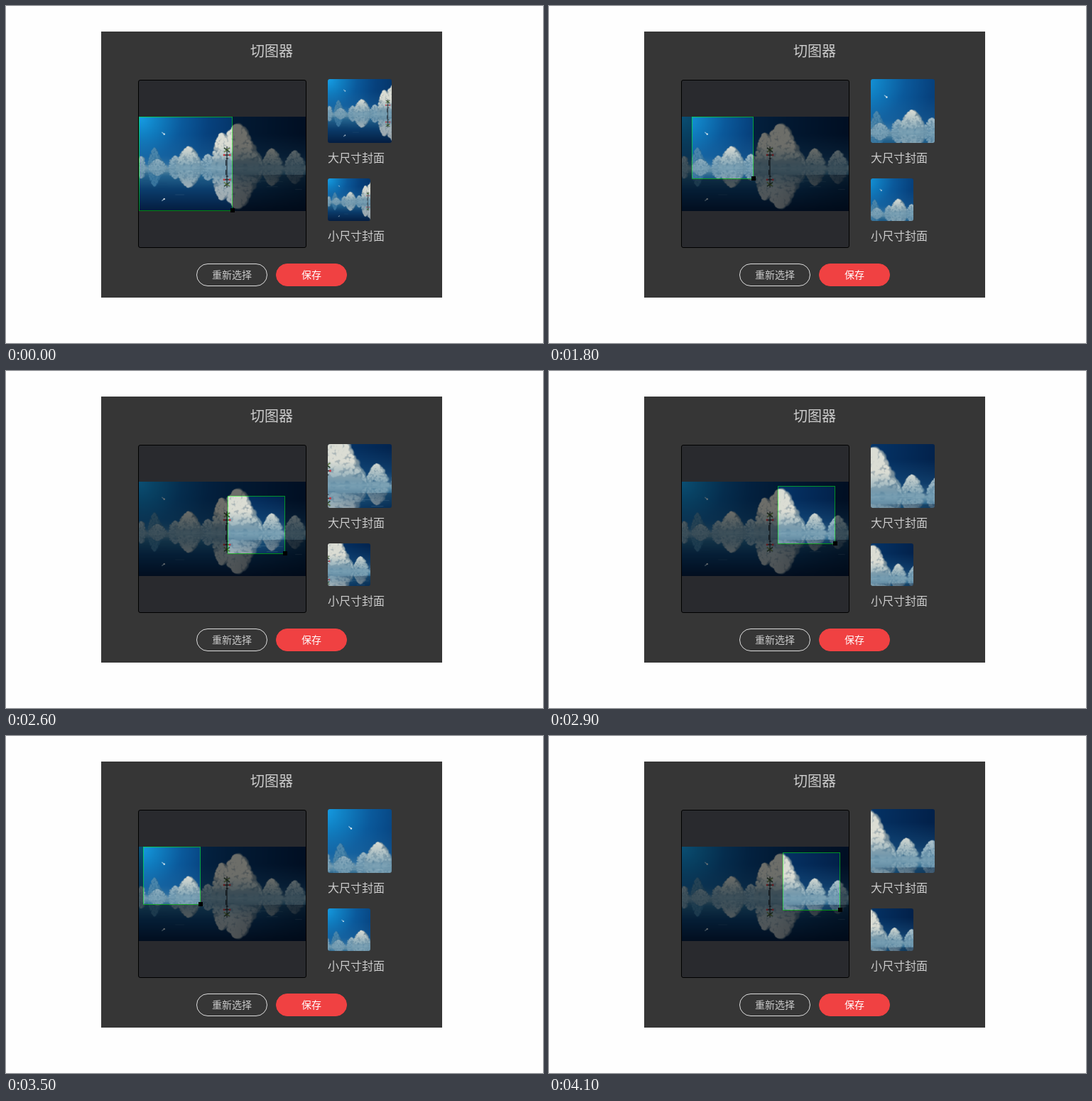
An HTML page with a canvas that plays this animation: 756 by 475 pixels, repeating every 5100 ms.

```html
<!DOCTYPE html>
<html lang="zh-CN">
<head>
<meta charset="utf-8">
<title>切图器</title>
<style>
  html, body { margin: 0; width: 100%; height: 100%; overflow: hidden; background: #fefefe; }
  body { position: relative; color: #ccc; font-family: "Noto Sans CJK SC", "Noto Sans CJK", sans-serif; }
  body > * { position: absolute; box-sizing: border-box; white-space: nowrap; }
  .panel { left: 134px; top: 36px; width: 480px; height: 375px; background: #363636; }
  .title { left: 134px; top: 48px; width: 480px; font-size: 20px; line-height: 30px; text-align: center; }
  .well { left: 186px; top: 104px; width: 237px; height: 237px; border: 1px solid #000; border-radius: 3px; background: #292a2e; }
  .label { left: 453px; font-size: 16px; line-height: 30px; }
  .button { top: 363px; width: 100px; height: 32px; border: 1px solid #ddd; border-radius: 16px; font-size: 14px; line-height: 28px; text-align: center; }
  .save { border-color: #f04142; background: #f04142; color: #fff; }
  canvas { left: 0; top: 0; }
</style>
</head>
<body>
<div class="panel"></div>
<div class="title">切图器</div>
<div class="well"></div>
<div class="label" style="top:198px">大尺寸封面</div>
<div class="label" style="top:308px">小尺寸封面</div>
<div class="button" style="left:268px">重新选择</div>
<div class="button save" style="left:380px">保存</div>
<canvas id="stage" width="756" height="475"></canvas>
<script>
const LOOP = 5100, TICK = 100;
const LEFT = 187, TOP = 156, W = 235, H = 133, HORIZON = 72, SCALE = 3;

// Selection drag: time in ms, x, y, size; straight moves between the points.
const PATH = [
  [0, 187, 156, 132], [1000, 187, 156, 132], [1100, 200, 156, 132], [1200, 201, 156, 132],
  [1700, 201, 156, 132], [1800, 201, 156, 87], [1900, 201, 156, 81], [2200, 201, 156, 81],
  [2300, 239, 184, 81], [2600, 312, 176, 81], [2900, 322, 162, 81],
  [3400, 187, 156, 81], [3500, 193, 156, 81], [3800, 309, 164, 81],
  [3900, 309, 164, 81], [4100, 329, 164, 81], [LOOP, 329, 164, 81]
];

function selectionAt(time) {
  const tick = Math.floor(time / TICK) * TICK;
  const next = PATH.findIndex(point => point[0] > tick);
  const from = PATH[next - 1], to = PATH[next];
  const k = (tick - from[0]) / (to[0] - from[0]);
  return from.slice(1).map((v, i) => Math.round(v + (to[i + 1] - v) * k));
}

let seed = 11;
function random() {
  seed = (seed * 16807) % 2147483647;
  return seed / 2147483647;
}

function layer() {
  const canvas = document.createElement('canvas');
  canvas.width = W * SCALE;
  canvas.height = H * SCALE;
  const g = canvas.getContext('2d');
  g.scale(SCALE, SCALE);
  return g;
}

function shade(gradient, ...stops) {
  for (const [at, color] of stops) gradient.addColorStop(at, color);
  return gradient;
}

function dot(g, x, y, r, fill) {
  g.fillStyle = fill;
  g.beginPath();
  g.arc(x, y, r, 0, 7);
  g.fill();
}

function line(g, x1, y1, x2, y2, color, width) {
  g.strokeStyle = color;
  g.lineWidth = width;
  g.beginPath();
  g.moveTo(x1, y1);
  g.lineTo(x2, y2);
  g.stroke();
}

// Cumulus heap: soft puffs in shadow, middle and lit tones, lit from the upper left.
function heap(g, x, halfWidth, height, size, tones) {
  const puffs = Math.ceil(halfWidth * height / size / 1.5);
  tones.forEach((tone, lit) => {
    for (let i = 0; i < puffs; i++) {
      const t = i / puffs * (1 - lit * 0.12);
      const r = size * (0.7 + random() * 0.5) * (1 - lit * 0.26);
      const px = x + (random() * 2 - 1) * halfWidth * t ** 0.55 - lit * size * 0.2;
      const py = HORIZON - height * (1 - t) + size * (1 - lit * 0.2);
      dot(g, px, py, r, shade(g.createRadialGradient(px, py, 0, px, py, r),
        [0, tone], [0.55, tone], [1, tone + '00']));
    }
  });
}

function paintClouds() {
  const g = layer();
  const white = ['#778d99', '#a9b4b6', '#dbddd4'];
  const pale = ['#58798f', '#8aa2b0', '#bfcdd1'];
  const blue = ['#1e5f91', '#2c6f9e', '#4a86ac'];
  g.beginPath();
  g.rect(0, 0, W, HORIZON);
  g.clip();
  heap(g, 23, 10, 29, 3, blue);
  heap(g, 4, 8, 17, 3, pale);
  heap(g, 27, 15, 13, 2.5, pale);
  heap(g, 52, 12, 18, 3, pale);
  heap(g, 98, 13, 20, 3, pale);
  heap(g, 220, 16, 25, 3.4, pale);
  heap(g, 188, 16, 28, 3.6, white);
  heap(g, 71, 19, 31, 4, white);
  heap(g, 118, 16, 50, 4.5, white);
  heap(g, 160, 18, 27, 4, white);
  heap(g, 140, 32, 63, 5.5, white);
  g.globalCompositeOperation = 'source-atop';
  g.fillStyle = shade(g.createLinearGradient(0, 42, 0, HORIZON), [0, '#4f86a600'], [1, '#4f86a6b0']);
  g.fillRect(0, 42, W, HORIZON - 42);
  return g.canvas;
}

function signal(g) {
  line(g, 124, 42, 124, HORIZON, '#182028', 1.1);
  line(g, 120, 44, 128, 50, '#1c3a20', 1.5);
  line(g, 128, 44, 120, 50, '#56702c', 1.3);
  line(g, 120, 54, 128, 54, '#20262b', 1.5);
  dot(g, 120, 54, 1.4, '#c8323b');
  dot(g, 128, 54, 1.4, '#c8323b');
  line(g, 122.5, 59, 126, 59, '#182028', 1.2);
  line(g, 122.6, 61, 122.6, 69, '#182028', 0.8);
}

function reflected(g, draw) {
  g.save();
  g.translate(0, HORIZON);
  g.scale(1, -0.93);
  g.translate(0, -HORIZON);
  draw();
  g.restore();
}

function paintScene() {
  const g = layer(), clouds = paintClouds();
  g.fillStyle = shade(g.createRadialGradient(0, 0, 0, 0, 0, 245),
    [0, '#16a0e8'], [0.1, '#1183c6'], [0.25, '#0b5a9c'], [0.4, '#07427e'], [0.6, '#053264'], [1, '#021c42']);
  g.fillRect(0, 0, W, HORIZON);
  g.fillStyle = shade(g.createLinearGradient(0, 25, 0, HORIZON),
    [0, '#2f7fb400'], [0.65, '#2f7fb448'], [1, '#6499b490']);
  g.fillRect(0, 25, W, HORIZON - 25);
  g.drawImage(clouds, 0, 0, W, H);

  g.fillStyle = shade(g.createLinearGradient(0, HORIZON, 0, H),
    [0, '#5f8da5'], [0.2, '#22618c'], [0.5, '#0b3d6c'], [1, '#041c3e']);
  g.fillRect(0, HORIZON, W, H - HORIZON);
  g.globalAlpha = 0.72;
  reflected(g, () => g.drawImage(clouds, 0, 0, W, H));
  g.globalAlpha = 1;
  g.fillStyle = shade(g.createLinearGradient(130, 0, W, 0), [0, '#00102800'], [1, '#00102888']);
  g.fillRect(0, HORIZON + 10, W, H - HORIZON - 10);
  for (let i = 0; i < 60; i++) {
    const x = random() * W, y = HORIZON + random() * random() * 40;
    line(g, x, y, x + 4 + random() * 14, y, i % 2 ? '#a9c4ce40' : '#0c3c6440', 0.6);
  }
  g.fillStyle = shade(g.createLinearGradient(0, 67, 0, 80),
    [0, '#9fbdc900'], [0.4, '#9fbdc966'], [1, '#9fbdc900']);
  g.fillRect(0, 67, W, 13);

  const comet = () => {
    line(g, 32.5, 22, 36, 25, '#c9e1ee', 0.9);
    dot(g, 35.8, 24.8, 1.1, '#f4f7f5');
  };
  comet();
  reflected(g, comet);
  reflected(g, () => signal(g));
  signal(g);
  return g.canvas;
}

const ctx = document.getElementById('stage').getContext('2d');
ctx.imageSmoothingQuality = 'high';
const scene = paintScene();

function drawCrop(x, y, size, dx, dy, side) {
  ctx.drawImage(scene, (x - LEFT) * SCALE, (y - TOP) * SCALE, size * SCALE, size * SCALE, dx, dy, side, side);
}

function drawPreview(x, y, size, top, side) {
  ctx.save();
  ctx.beginPath();
  ctx.roundRect(453, top, side, side, 3);
  ctx.clip();
  drawCrop(x, y, size, 453, top, side);
  ctx.restore();
}

function drawSelection(x, y, size) {
  drawCrop(x, y, size, x, y, size);
  ctx.strokeStyle = '#00ff00';
  ctx.lineWidth = 1;
  ctx.setLineDash([1, 1]);
  ctx.strokeRect(x + 0.5, y + 0.5, size - 1, size);
  ctx.setLineDash([]);
  ctx.fillStyle = '#000';
  ctx.fillRect(x + size - 3, y + size - 3, 6, 6);
}

function frame() {
  const [x, y, size] = selectionAt(performance.now() % LOOP);
  ctx.clearRect(0, 0, 756, 475);
  ctx.drawImage(scene, LEFT, TOP, W, H);
  ctx.fillStyle = 'rgba(0, 0, 0, .5)';
  ctx.fillRect(LEFT, TOP, W, H);
  drawSelection(x, y, size);
  drawPreview(x, y, size, 103, 90);
  drawPreview(x, y, size, 243, 60);
  requestAnimationFrame(frame);
}
frame();
</script>
</body>
</html>
```
